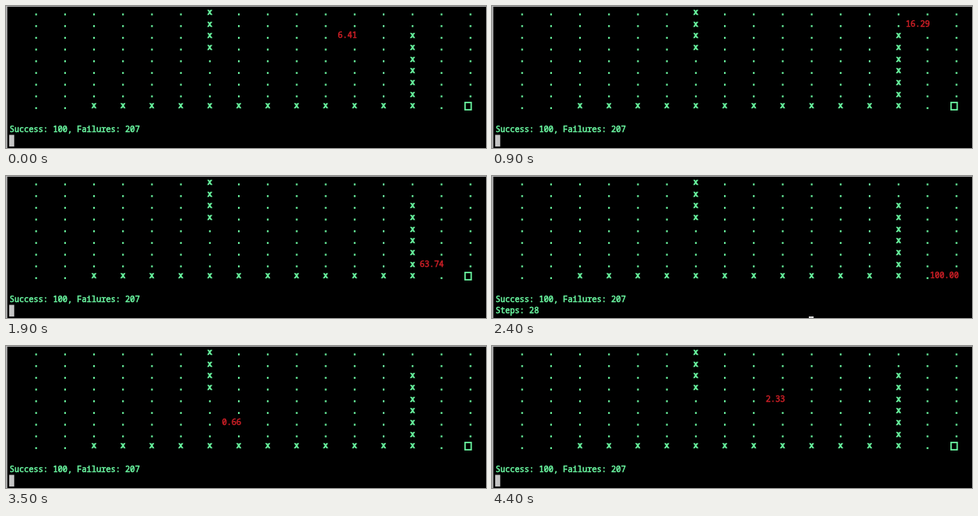
Recreate the animation shown at these times as an HTML page with a canvas. Size 600 px wide and 178 px high, loop 4500 ms.

```html
<!DOCTYPE html>
<html lang="en">
<head>
<meta charset="utf-8">
<title>Grid walk</title>
<style>
html, body { margin: 0; width: 100%; height: 100%; overflow: hidden; background: #000; }
canvas { display: block; }
</style>
</head>
<body>
<canvas id="stage" width="600" height="178"></canvas>
<script>
const ctx = document.getElementById('stage').getContext('2d');
const LOOP = 4500, TICK = 100, STEP = 190;
const COLS = 16, ROWS = 9, CHAR = 6.033, LINE = 14.68;
const GREEN = '#6cfca4', RED = '#cc1f26', GREY = '#c4c4c4';
const GOAL_AT = 2250, RESTART = 2530;

// Each leg: first column, row and value, then moves, then the value reached.
const secondHalf = [
  { at: [11, 2], from: 6.41, moves: 'UR', to: 10.29 },
  { at: [12, 1], from: 10.29, moves: 'RRDDD', to: 32.43 },
  { at: [14, 4], from: 32.43, moves: 'DDDDR', to: 100 }
];
const firstHalf = [
  { at: [2, 6], from: 0.02, moves: 'RR', to: 0.09 },
  { at: [4, 6], from: 0.09, moves: 'RRR', to: 0.66 },
  { at: [7, 6], from: 0.66, moves: 'RURU', to: 2.33 }
];
const DIRS = { U: [0, -1], D: [0, 1], R: [1, 0] };

function walk(legs) {
  const path = [];
  legs.forEach((leg, n) => {
    let [col, row] = leg.at;
    if (n === 0) path.push({ col, row, value: leg.from });
    [...leg.moves].forEach((m, i) => {
      col += DIRS[m][0];
      row += DIRS[m][1];
      const part = (i + 1) / leg.moves.length;
      path.push({ col, row, value: leg.from * Math.pow(leg.to / leg.from, part) });
    });
  });
  return path;
}

const late = walk(secondHalf), early = walk(firstHalf);

function agentAt(t) {
  const path = t < RESTART ? late : early;
  const start = t < RESTART ? -30 : RESTART;
  const i = Math.floor((t - start) / STEP);
  return path[Math.max(0, Math.min(path.length - 1, i))];
}

const isWall = (c, r) =>
  (c === 6 && r < 4) || (c === 13 && r > 1) || (r === 8 && c > 1 && c < 14);

const colX = c => 37.6 + c * CHAR * 6;
const rowY = r => 11 + r * LINE;

// A thin outline gives the medium weight of the terminal font.
function text(str, x, y, color, align = 'left') {
  ctx.fillStyle = ctx.strokeStyle = color;
  ctx.textAlign = align;
  ctx.lineWidth = 0.5;
  ctx.fillText(str, x, y);
  ctx.strokeText(str, x, y);
}

function box(x, y, w, h, color) {
  ctx.fillStyle = color;
  ctx.fillRect(x, y, w, h);
}

function drawGrid(agent) {
  ctx.font = 'bold 10.6px "DejaVu Sans Mono", monospace';
  for (let r = 0; r < ROWS; r++) {
    for (let c = 0; c < COLS; c++) {
      if (c === agent.col && r === agent.row) continue;
      const x = colX(c), y = rowY(r);
      if (c === COLS - 1 && r === ROWS - 1) {
        ctx.strokeStyle = GREEN;
        ctx.lineWidth = 1.7;
        ctx.strokeRect(573.8, 120.9, 7.7, 9.2);
      } else if (isWall(c, r)) {
        text('x', x - 0.1, y, GREEN, 'center');
      } else {
        box(x - 1, y - 1.6, 2.1, 2.3, GREEN);
      }
    }
  }
}

function draw(t) {
  const agent = agentAt(t);
  const done = t >= GOAL_AT && t < RESTART;
  box(0, 0, 600, 178, '#000');
  box(0, 0, 600, 1, '#a8a8a8');
  box(0, 0, 1.6, 178, '#bcbcbc');
  drawGrid(agent);

  ctx.font = '10.05px "Noto Sans Mono", "DejaVu Sans Mono", monospace';
  text(agent.value.toFixed(2), colX(agent.col) + CHAR / 2, rowY(agent.row), RED, 'right');
  text('Success: 100, Failures: 207', 4.4, rowY(10), GREEN);
  if (done) {
    text('Steps: 28', 4.4, rowY(11), GREEN);
    box(396, 176, 6, 2, '#d8d8d8');
  } else {
    box(4, 161.5, 6.3, 14.7, GREY);
  }
}

function frame(now) {
  draw(Math.floor(now % LOOP / TICK) * TICK);
  requestAnimationFrame(frame);
}
requestAnimationFrame(frame);
</script>
</body>
</html>
```
